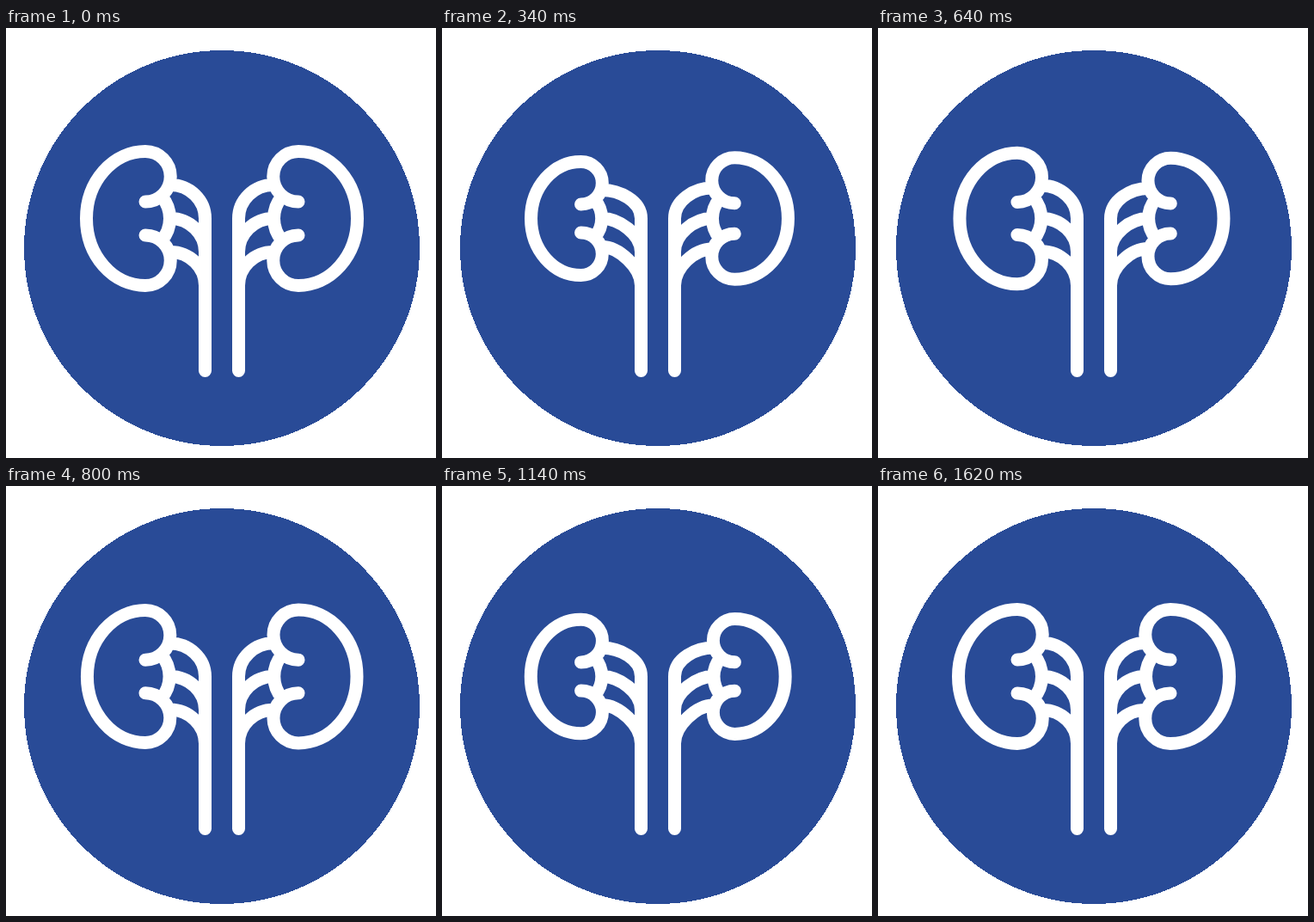
Write an HTML page that moves like this. It is 500x500 px and loops after 2 s.

```html
<!DOCTYPE html>
<html lang="en">
<head>
<meta charset="utf-8">
<title>Kidneys</title>
<style>
  html, body { margin: 0; width: 100%; height: 100%; overflow: hidden; background: #fff; }
  svg { display: block; width: 100vw; height: 100vh; }
  path { fill: none; stroke: #fff; stroke-width: 15; stroke-linecap: round; }
</style>
</head>
<body>
<svg viewBox="0 0 500 500">
  <circle cx="251" cy="256" r="230" fill="#294b97" shape-rendering="crispEdges"/>
  <path id="left"/>
  <path id="right" transform="matrix(-1 0 0 1 502 0)"/>
</svg>
<script>
const LOOP = 2000, STEP = 20, SHRINK = 0.155;
const CENTER = { x: 159, y: 221.5 };
const STEM_X = 231.5;

const sides = [
  { path: document.getElementById('left'), delay: 0, period: 730 },
  { path: document.getElementById('right'), delay: 140, period: 710 },
];

// Two smooth squeezes, then rest at full size.
function scaleAt(time, { delay, period }) {
  const phase = (time - delay) / period;
  if (phase <= 0 || phase >= 2) return 1;
  return 1 - SHRINK * (1 - Math.cos(phase * 2 * Math.PI)) / 2;
}

function kidneyPath(scale) {
  const at = (x, y) =>
    `${CENTER.x + (x - CENTER.x) * scale} ${CENTER.y + (y - CENTER.y) * scale}`;
  const arc = (rx, ry, sweep, x, y) =>
    `A${rx * scale} ${ry * scale} 0 0 ${sweep} ${at(x, y)}`;

  const body = `M${at(162, 202)}` + arc(29.25, 29.25, 0, 162, 143.5)
    + arc(68.5, 78, 0, 162, 299.5) + arc(29.25, 29.25, 0, 162, 241);
  const hilum = `M${at(181, 196)}` + arc(39, 39, 1, 181, 247);

  // Vessels start on the kidney and bend into the fixed stem.
  const vessels = [182.5, 221.5, 260.5].map(y =>
    `M${at(191, y)}C${at(214, y)} ${STEM_X} ${y + 18} ${STEM_X} ${y + 39}`).join('');
  return body + hilum + vessels + `M${STEM_X} 221V398.5`;
}

function draw(now) {
  const time = Math.floor((now % LOOP) / STEP) * STEP;
  for (const side of sides) side.path.setAttribute('d', kidneyPath(scaleAt(time, side)));
  requestAnimationFrame(draw);
}
draw(performance.now());
</script>
</body>
</html>
```
